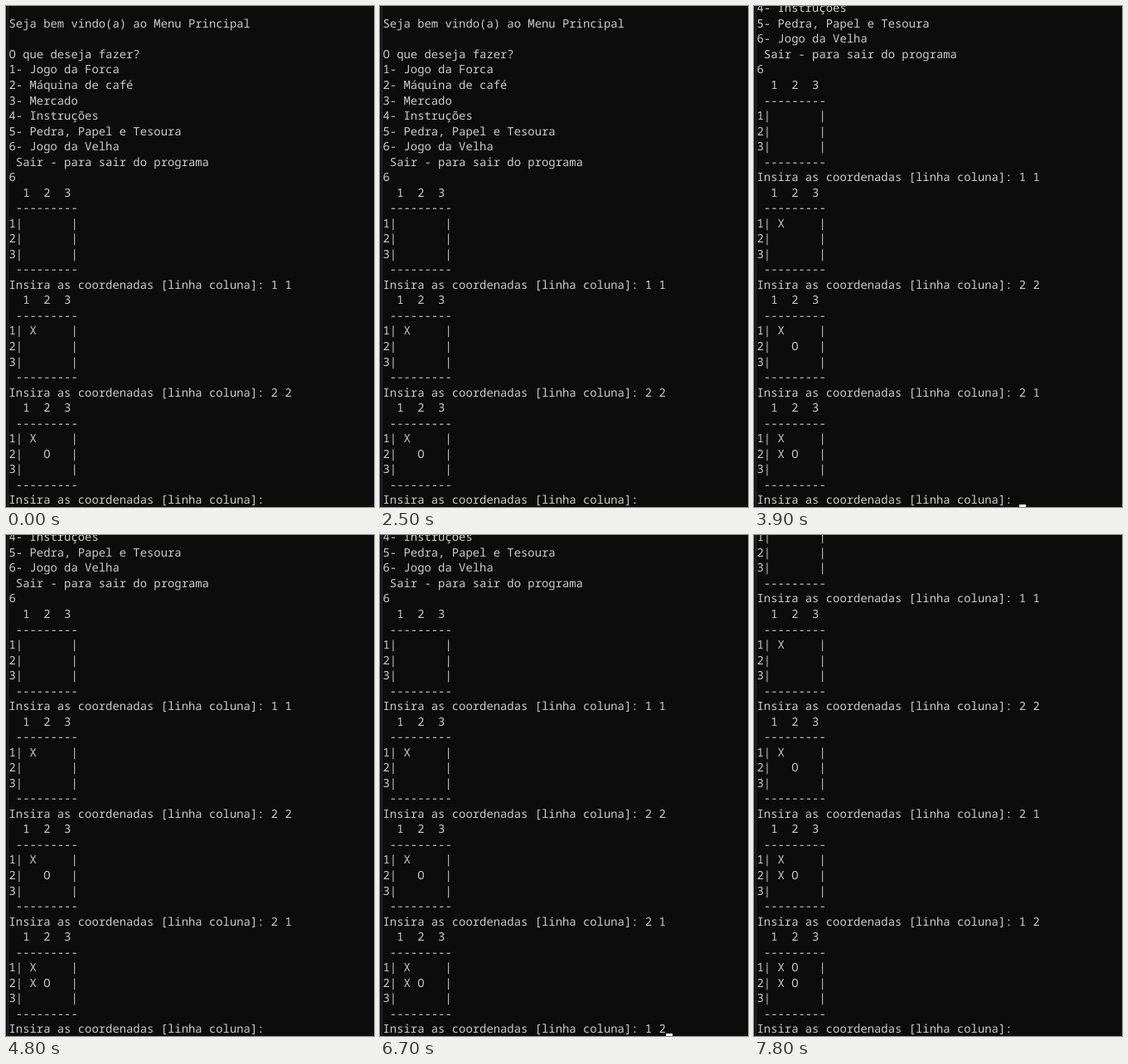
These frames come from a looping animation (444x604 px, 8000 ms). An HTML page:

```html
<!DOCTYPE html>
<html lang="pt">
<head>
<meta charset="utf-8">
<style>
  html, body { margin: 0; width: 100%; height: 100%; overflow: hidden; background: #0c0c0c; }
  #edge {
    position: absolute; left: 0; top: 0; width: 2px; height: 100%;
    background: #12111a; border-right: 1px solid #29292e;
  }
  #screen {
    position: absolute; left: 3.5px; top: -5.7px; margin: 0;
    font: 300 13.88px/18.53px "Noto Sans Mono", "DejaVu Sans Mono", monospace;
    font-variant-ligatures: none; text-rendering: geometricPrecision;
    color: #ccc; white-space: pre;
  }
  #cursor { position: absolute; top: 601px; width: 8.33px; height: 3px; background: #f2f2f2; }
</style>
</head>
<body>
<div id="edge"></div>
<pre id="screen"></pre>
<div id="cursor"></div>
<script>
const LOOP = 8000, ROWS = 33, CELL = 8.33, LEFT = 3.5;
const PROMPT = 'Insira as coordenadas [linha coluna]: ';

const MENU = `
Seja bem vindo(a) ao Menu Principal

O que deseja fazer?
1- Jogo da Forca
2- Máquina de café
3- Mercado
4- Instruções
5- Pedra, Papel e Tesoura
6- Jogo da Velha
 Sair - para sair do programa
6`.split('\n');

// Each move: what the player typed and the cell it fills
const MOVES = [['1 1', 0, 'X'], ['2 2', 4, 'O'], ['2 1', 3, 'X'], ['1 2', 1, 'O']];

// [start ms, moves already played, typed text, cursor visible]
const STATES = [
  [0, 2, '', false],
  [1900, 2, '', true],
  [2500, 2, '', false],
  [2900, 2, '2', true],
  [3100, 2, '2 ', true],
  [3400, 2, '2 1', true],
  [3500, 2, '2 1', false],
  [3900, 3, '', true],
  [4400, 3, '', false],
  [5100, 3, '', true],
  [5500, 3, '1', true],
  [5600, 3, '1', false],
  [5900, 3, '1 ', true],
  [6100, 3, '1 2', true],
  [6200, 3, '1 2', false],
  [6700, 3, '1 2', true],
  [6800, 4, '', true],
  [7600, 4, '', false]
];

function boardLines(cells) {
  const rule = ' ' + '-'.repeat(9);
  const rows = [0, 1, 2].map(r =>
    `${r + 1}| ${cells.slice(r * 3, r * 3 + 3).join(' ')} |`);
  return ['  1  2  3', rule, ...rows, rule];
}

function terminalText(played, typed) {
  const cells = Array(9).fill(' ');
  const lines = [...MENU, ...boardLines(cells)];
  for (const [entry, cell, mark] of MOVES.slice(0, played)) {
    cells[cell] = mark;
    lines.push(PROMPT + entry, ...boardLines(cells));
  }
  lines.push(PROMPT + typed);
  return lines.slice(-ROWS).join('\n');
}

const screenEl = document.getElementById('screen');
const cursorEl = document.getElementById('cursor');
const start = performance.now();
let shown;

function draw() {
  const t = (performance.now() - start) % LOOP;
  const state = STATES.findLast(s => s[0] <= t);
  if (state !== shown) {
    const [, played, typed, cursorOn] = shown = state;
    screenEl.textContent = terminalText(played, typed);
    cursorEl.style.left = LEFT + (PROMPT.length + typed.length) * CELL + 'px';
    cursorEl.style.visibility = cursorOn ? 'visible' : 'hidden';
  }
  requestAnimationFrame(draw);
}
draw();
</script>
</body>
</html>
```
